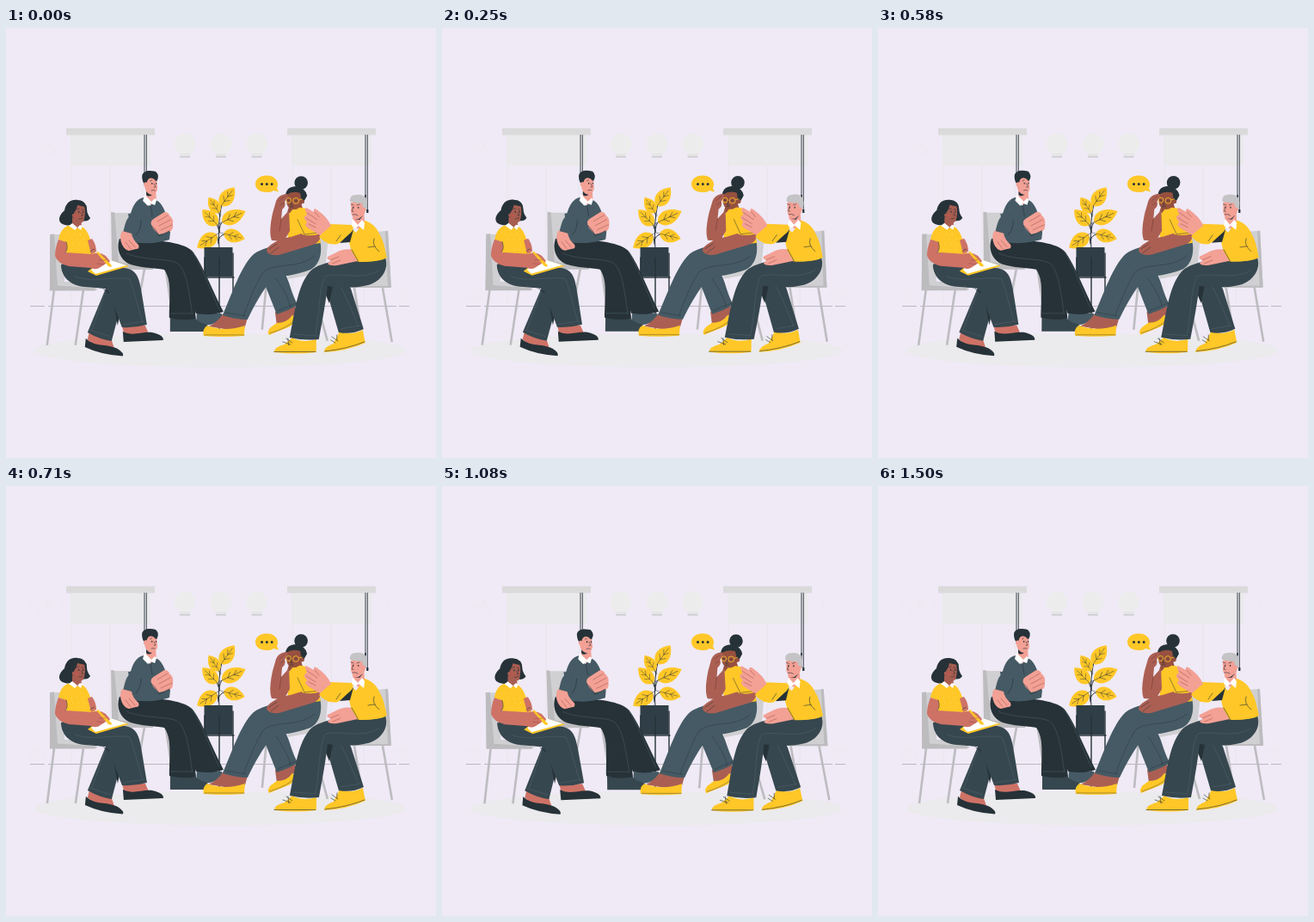
An HTML page for the animation above (1540 ms loop, 500 by 500 pixels).

```html
<!DOCTYPE html>
<html lang="en">
<head>
<meta charset="utf-8">
<title>Group conversation</title>
<style>
html, body { margin: 0; height: 100%; overflow: hidden; background: #efeaf6 }
svg { display: block; width: 100vw; height: 100vh }
.navy { fill: #263238 } .pants { fill: #37474f } .slate { fill: #455a64 }
.yellow { fill: #ffc727 } .white { fill: #fff }
.rose { fill: #ce7266 } .tan { fill: #a85d51 } .brown { fill: #ab5f53 } .umber { fill: #96503f } .pink { fill: #f3a095 }
.grey { fill: #bcbbbe } .light { fill: #d0cfd2 }
.line { fill: none; stroke: #263238; stroke-width: .6; stroke-linecap: round; stroke-linejoin: round }
.seam { fill: none; stroke: #5b6c74; stroke-width: .4 }
.fold { fill: none; stroke: #8c463b; stroke-width: .45; stroke-linecap: round }
.legs { fill: none; stroke: #bdbcc0; stroke-width: 2.6 }
.brick { fill: none; stroke: #ebe7f0; stroke-width: .7 }
</style>
</head>
<body>
<svg viewBox="0 0 500 500">
  <defs>
    <g id="leaf">
      <path class="yellow" d="M0 0C-10-3-10-15 0-24C10-14 9-4 0 0"/>
      <path class="line" d="M0 4V-20M0-6l-4-4M0-6l4-4M0-12l-3-4M0-12l3-4" style="stroke-width:.4"/>
    </g>
    <g id="window">
      <path fill="none" stroke="#e8e5ea" stroke-width=".8" d="M76 160V322M121 160V322M159 160V322"/>
      <path fill="#eae9eb" d="M75 124h93v36H75z"/>
      <path fill="#dbdadb" d="M70 116.500h103v8H70z"/>
    </g>
    <g id="lamp">
      <circle cy="135" r="12.500" fill="#ececed"/>
      <path fill="#e6e5e7" d="M-7 146h14l-2 3H-5z"/>
      <path fill="#cdccce" d="M-6 149H6v1.600H-6z"/>
    </g>
  </defs>

  <path class="brick" d="M28 132h20v7H28zM50 132h16v7H50zM38 141h18v6H38zM443 132h18v6h-18zM28 308h16v6H28zM452 308h18v6h-18z"/>
  <use href="#window"/><use href="#window" x="257"/>
  <use href="#lamp" x="208"/><use href="#lamp" x="250"/><use href="#lamp" x="291.500"/>
  <path class="line" style="stroke-width:.9" d="M161 124.500V172M163.300 124.500V172M418 124.500V211M420.300 124.500V214"/>
  <path class="navy" d="M417.200 194h1.600v3h-1.600zM419.200 211h2.200v4h-2.200z"/>
  <path fill="none" stroke="#a5a3a9" stroke-width=".7" d="M28 323.500h17M49 323.500h405M457 323.500h12"/>
  <ellipse cx="249" cy="375" rx="216" ry="19.500" fill="#ebeaec"/>

  <g id="plant">
    <path class="line" style="stroke-width:1" d="M248 257C247 240 247 222 251 205M248 238Q248 228 252 225M247 248Q248 241 254 240M247 251Q247 242 243 240M248 236L245 228M249 219L247 213"/>
    <use href="#leaf" transform="translate(250 207)rotate(36)scale(1.120)"/>
    <use href="#leaf" transform="translate(248 215)rotate(-34)scale(.92)"/>
    <use href="#leaf" transform="translate(251 226)rotate(65)scale(1.150 1.270)"/>
    <use href="#leaf" transform="translate(246 229)rotate(-45)scale(1.050)"/>
    <use href="#leaf" transform="translate(253 239)rotate(104)scale(1.060)"/>
    <use href="#leaf" transform="translate(245 240)rotate(-124)scale(1.150)"/>
    <path fill="#303f47" d="M230.500 255h33v34h-33z"/>
    <path class="line" style="stroke-width:1.400" d="M231 267V318M264 262V318M248 267V350M230 290h35"/>
  </g>

  <g id="people">
    <g id="chairs">
      <path class="legs" d="M186 282L192 322M161 281L155 313M303 296L298 351M352 284L374 364"/>
      <path class="light" d="M123 215h24v65h-24zM356 240h19l-4 44-43 8-2-10z"/>
      <path class="grey" d="M122 214l4 .500L131 272l40 7v2h-42l-6-8z"/>
    </g>

    <g id="listener">
      <path class="slate" d="M222 332h29q3 6-3 9l-10 4-17 1z"/>
      <path class="navy" d="M152 247C182 246 211 251 218 261C230 278 239 303 253 330Q239 335 221 332L205 286z"/>
      <path class="pants" d="M191 337h29c3 6 12 6 15 9q0 6-5 7H191z"/>
      <path class="navy" d="M132 245C128 256 132 270 145 275C157 279 173 279 184 281C193 293 190 314 190 337Q205 341 221 338C218 310 221 278 212 268C202 253 170 249 145 247z"/>
      <path class="seam" d="M140 262C160 271 189 267 200 274C211 283 213 311 217 333M191 332h26M216 259C228 277 237 304 248 327"/>
      <path class="pink" d="M163 186v15q8 9 12 3l-1-14z"/>
      <path class="slate" d="M160 197C151 199 147 207 144 219L136 240L144 249C160 251 178 250 190 246L191 237C188 222 184 204 174 200L167 207z"/>
      <path class="white" d="M161 194l-2 7 6 6 3-3 5 2 2-6-2-2-4 4z"/>
      <path class="line" d="M153 218Q151 232 145 241M168 207l2 12"/>
      <path class="pink" d="M162 175C163 168 174 168 175 176L176 187Q174 195 168 194Q162 192 161 184z"/>
      <path class="navy" d="M163 184C160 181 158 178 158 172C159 166 166 165 174 167Q179 172 175 178C171 175 167 172 164 178z"/>
      <circle class="pink" cx="162.500" cy="182" r="2.600"/>
      <path class="line" d="M167.500 178l2-1M173 177l2 .500M172 181l2 4-2 .400M169 189q2-1 4 0"/>
      <path class="navy" d="M169 180h1.200v1.800H169zM174 180h1v1.800h-1zM163 190q3 4 7 4-5 3-7 0z"/>
      <path class="pink" d="M169 229Q167 224 173 221L184 214Q189 214 190 218Q195 222 194 228Q195 236 188 238L178 240Q171 236 169 229z"/>
      <path class="slate" d="M142 216Q153 215 157 223L156 237L170 232L179 242L190 236V245Q167 254 146 248z"/>
      <path class="line" d="M157 224Q157 235 151 241M169 230q4 2 9 12l12-6"/>
      <path class="fold" d="M176 225l12-7M178 230l13-7M180 235l13-6"/>
      <path class="slate" d="M144 219C139 222 138 231 136 238L147 243L153 226z"/>
      <path class="pink" d="M135 236L146 239Q147 246 154 252Q156 257 151 257L143 259Q138 258 135 252Q131 243 135 236z"/>
      <path class="fold" d="M139 249l6 8M143 247l7 8"/>
    </g>

    <g id="writer">
      <path class="legs" d="M56 305L48 369M90 305L81 369"/>
      <path class="light" d="M52 240h16v55h37l1 10H51z"/>
      <path class="grey" d="M51 240l5-.500 4 60 44 3v3H51z"/>
      <path class="rose" d="M97 354l26 9 3 9-23-2-8-8zM135 346h27l4 9-18 4-11-5z"/>
      <path class="navy" d="M93 361C105 372 115 366 130 373Q138 378 136 381.500Q111 380 92 371zM136 353C148 359 157 353 170 354Q184 357 183 363Q160 364 137 365z"/>
      <path class="pants" d="M64 275C64 291 77 299 116 303L95 354Q109 362 123 364L134 322L128 280z"/>
      <path class="navy" d="M112 303L123 308L130 346L135 320z"/>
      <path class="pants" d="M67 270C60 285 72 299 91 301L118 303L135 348Q150 349 164 345L157 303C153 281 146 278 125 279z"/>
      <path class="seam" d="M80 289C99 297 129 288 144 292C149 304 154 327 159 342M136 345l25-4M97 351l25 8M116 306L100 351"/>
      <path class="navy" d="M83 200C74 199 69 205 68 212C62 217 60 223 64 227C72 232 83 229 88 224Q95 226 98 221Q94 216 94 211Q94 201 83 200z"/>
      <path class="tan" d="M77 220v10l7 6 4-5-1-9z"/>
      <path class="yellow" d="M75 229L83 233L88 231C96 235 98 246 104 263L70 264L69 249L61 246C63 237 66 231 75 229z"/>
      <path class="white" d="M77 227l-4 3 7 5 3-3 4 3 2-5-3-1-3 3z"/>
      <path fill="none" stroke="#ffdf80" stroke-width=".8" stroke-dasharray="1 6" d="M72 240h20M76 246h20M70 252h28M76 258h24"/>
      <path class="tan" d="M79 207Q86 202 91 207Q93 216 90 225Q84 230 79 223z"/>
      <path class="navy" d="M76 222C78 214 82 213 83 206L92 208Q90 199 83 201Q74 204 73 215z"/>
      <circle class="tan" cx="79" cy="218" r="2.300"/>
      <path class="line" d="M82 211l3-1M88 211l2 .500M87.500 215l2 3-2 .400M85 222q2 1 4-1"/>
      <path class="navy" d="M84 213h1.200v1.800H84zM89 213h1.200v1.800H89z"/>
      <path fill="#d9544d" d="M82 217a2 1.500 0 1 0 .1 0z" opacity=".5"/>
      <path class="rose" d="M95 247l5-2q5 7 5 15l-6 3z"/>
      <path class="yellow" d="M95 283l19-15 29 9-38 11z"/>
      <path class="white" d="M99 281l16-13 25 8-36 10z"/>
      <path class="rose" d="M61 246L70 249Q72 257 69 261L100 263Q109 260 116 265L121 271Q120 274 116 274L110 278Q105 282 99 279L73 277Q60 274 57 265Q57 256 61 246z"/>
      <path class="yellow" d="M105 261l2-1 16 16-1 2-3-1z"/>
      <path class="line" d="M70 249Q73 257 69 261M98 260q4-4 5-2"/>
      <path class="fold" d="M108 270l8 0M106 274l8 1"/>
    </g>

    <g id="speaker">
      <path class="brown" d="M313 330l22-8 4 8-12 11-12 4zM253 332l28 5-3 11-18 3-24-4q10-5 17-15z"/>
      <path class="yellow" d="M315 343Q327 343 333 334L337 336Q337 345 326 349L306 357Q303 353 308 348zM234 346Q255 354 278 346L277 358Q252 360 230 358Q228 350 234 346z"/>
      <path class="line" d="M307 355q20-6 29-15M231 357h46" style="stroke-width:.4"/>
      <path class="slate" d="M318 276C331 291 331 310 340 322Q328 329 315 333L297 288z"/>
      <path class="slate" d="M365 247C368 259 366 275 354 281C337 288 320 288 309 292C299 305 289 322 281 339Q267 339 252 334C263 309 273 277 288 263C304 251 340 249 365 247z"/>
      <path class="seam" d="M359 265C340 281 314 272 299 284C288 302 283 318 276 335M255 331l24 4M314 291C322 303 329 314 331 325M316 329l22-9" style="stroke:#263238"/>
      <circle class="navy" cx="343" cy="180" r="7.800"/>
      <path class="navy" d="M325 194Q326 184 338 184Q349 187 350 195L345 204L338 198z"/>
      <path class="umber" d="M331 201h11l4 12-9 7-10-6z"/>
      <path class="yellow" d="M334 210C347 206 357 213 361 224L366 250Q346 254 328 247L326 220z"/>
      <path class="umber" d="M326 194Q333 189 342 192L344 204Q341 212 333 211Q325 209 326 198z"/>
      <circle class="umber" cx="344.500" cy="202" r="2.400"/>
      <g fill="none" stroke="#ffc727" stroke-width=".8"><circle cx="328.500" cy="200.500" r="3"/><circle cx="337" cy="201" r="3.400"/><path d="M340.500 200l4-1"/></g>
      <path class="line" d="M327 200l2 1M336 201l2 0M332 202l-1 4 2 0M330 208h4"/>
      <path class="brown" d="M314 201Q317 194 325 193Q329 193 327 197L324 202Q326 207 321 211L320 222L329 212L330 236L323 248L309 247Q305 238 310 215z"/>
      <path class="fold" d="M318 201l6-5M319 206l4-3M320 222l-2 14" style="stroke:#5e3029"/>
      <path class="brown" d="M347 238L364 236Q369 247 357 252L324 262Q311 267 304 261Q301 257 308 252L319 245L331 243z"/>
      <path class="yellow" d="M346 218Q359 215 363 229L366 239Q355 243 344 240z"/>
      <path class="line" d="M339 223L347 240L365 238M306 257l9-6M308 262l9-7" style="stroke-width:.5"/>
    </g>

    <g id="comforter">
      <path class="legs" d="M405 302L413 350M438 302L449 365"/>
      <path class="light" d="M428 237l16-1 4 66h-46v-7h26z"/>
      <path class="grey" d="M441 236h3l4 66h-46v-2h42z"/>
      <path class="yellow" d="M333 360q12 7 28 2v15Q337 380 312 377Q312 371 324 368zM388 353q15 5 27-2l3 15Q396 376 370 377Q370 371 381 367z"/>
      <path class="line" d="M312 376.500h48M371 376Q398 373 417 365M333 366l-7-5M331 368l-9-3M329 369l-1-8M386 364l-7-5M383 366l-5-3M385 363l0-6"/>
      <path class="pants" d="M375 282C390 287 400 296 403 309L416 350Q402 357 387 354L370 296z"/>
      <path class="navy" d="M374 296L371 308L376 320L381 296z"/>
      <path class="pants" d="M441 267C446 281 436 295 421 299C404 303 391 302 374 300C372 318 368 341 364 362Q347 364 330 360C335 337 338 302 352 285C363 271 390 271 408 266z"/>
      <path class="seam" d="M435 281C415 295 385 283 371 289C364 302 365 331 360 357M334 356l27 2M389 301C396 313 403 331 410 347M389 350l23-4"/>
      <path class="pink" d="M403 215l13-3 1 14-7 8-7-5z"/>
      <path class="yellow" d="M417 224C433 228 438 246 443 267Q426 274 404 270L399 249L386 249L375 251L365 241L377 229L400 232L407 238z"/>
      <path class="navy" d="M388 250L404 234L400 249z"/>
      <path class="yellow" d="M377 228L403 229Q405 234 401 238L386 251Q375 254 364 243z"/>
      <path class="white" d="M403 222l-1 8 4 3 4-3 6 5 1-8-3-4-5 6z"/>
      <path class="pink" d="M401 203L415 199Q419 203 418 211Q417 220 409 223Q402 221 401 214z"/>
      <path fill="#c4c3c5" d="M400 202Q399 194 407 194Q418 192 420 203Q420 212 416 213L414 204Q407 204 400 202z"/>
      <circle class="pink" cx="416" cy="211" r="2.300"/>
      <path class="line" d="M401 205l3 1M408 206l3-1M404 208l-2 5 2 .500M403 217q3-1 6 1"/>
      <path class="navy" d="M403 208h1v1.800h-1zM409 208h1.200v1.800H409zM405 222l5 0 5-4-4 5z"/>
      <path class="pink" d="M378 230Q374 220 361 211Q357 209 358 214L349 209Q346 210 350 217L347 219Q346 222 350 226L348 228Q348 231 353 234L365 241z"/>
      <path class="fold" d="M350 215l12 8M349 221l11 7M352 228l8 4M359 214l5 6"/>
      <path class="pink" d="M404 258Q393 256 384 261L374 266Q372 269 378 270L374 274Q377 277 385 276L409 271z"/>
      <path class="fold" d="M377 270l10-4M380 274l9-4"/>
      <path class="yellow" d="M424 232C438 238 441 255 442 267Q437 272 409 272L401 258L422 255L421 247z"/>
      <path class="line" d="M428 245Q425 253 434 260M402 258l8 14M421 255l8-1M384 248l5-7"/>
    </g>
  </g>

  <g id="bubble">
    <path class="yellow" d="M303 171.500c8 0 13 5 13 10q0 3-1 5l2 4-6-1.500c-3 2-5 2-8 2-8 0-13-4-13-9.500s5-10 13-10"/>
    <path stroke="#263238" stroke-width="3" stroke-linecap="round" d="M297.500 181.500h.01M303.300 181.500h.01M309.100 181.500h.01"/>
  </g>
</svg>
<script>
const LOOP = 1540, PEAK = 345, PIVOT = 260, LEAN = 0.75;
const people = document.getElementById('people');

function draw(now) {
  const sway = Math.cos((now % LOOP - PEAK) / LOOP * 2 * Math.PI);
  people.setAttribute('transform',
    `translate(0 ${PIVOT - 0.35 * sway}) skewX(${-LEAN * sway}) translate(0 ${-PIVOT})`);
  requestAnimationFrame(draw);
}
draw(performance.now());
</script>
</body>
</html>
```
